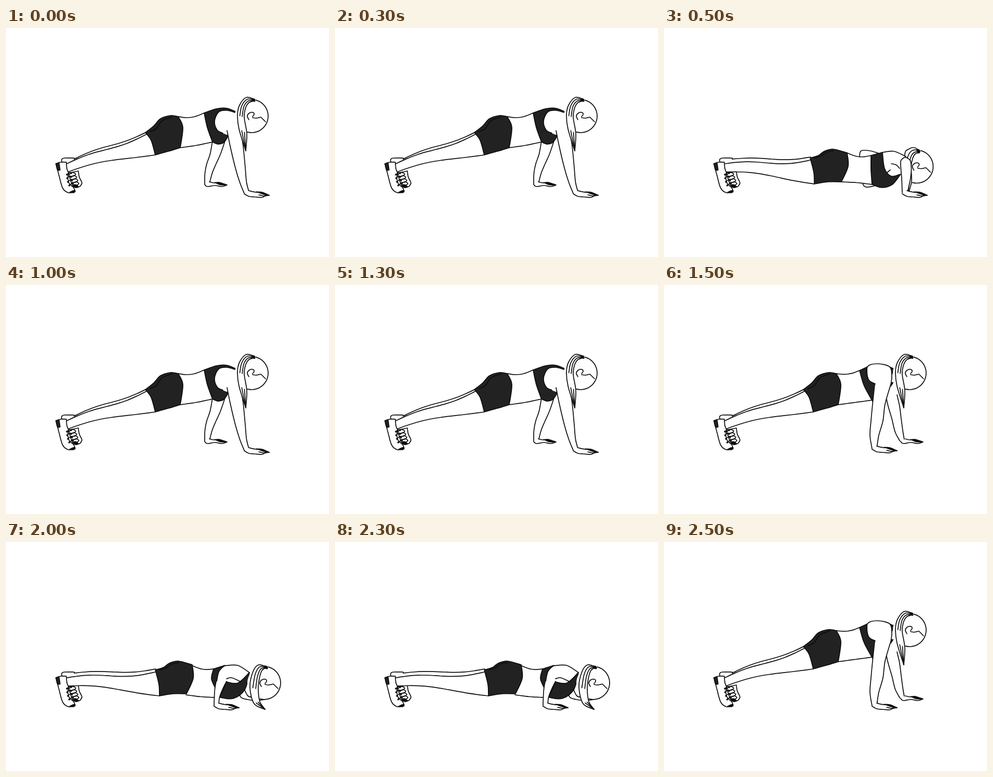
Animation, 621 px wide and 442 px high, one loop 3 s. Source, as an HTML page:

```html
<!DOCTYPE html>
<html lang="en">
<head>
<meta charset="utf-8">
<title>Push-up</title>
<style>
  html, body { margin: 0; width: 100%; height: 100%; overflow: hidden; background: #fff; }
  svg { display: block; width: 621px; height: 442px; }
  path { stroke: #0c0c0c; stroke-width: 1.7; stroke-linejoin: round; stroke-linecap: round; }
  .line, .dot { fill: none; }
  .dot { stroke-width: 3.4; }
  .skin, .fill { fill: #fff; }
  .fill { stroke: none; }
  .cloth { fill: #222; }
  .ink { fill: #0c0c0c; stroke-width: 1; }
</style>
</head>
<body>
<svg id="stage" viewBox="0 0 621 442"></svg>
<script>
const NS = 'http://www.w3.org/2000/svg';
const stage = document.getElementById('stage');
let layer = stage;

const points = s => s.trim().split(/\s+/).map(p => p.split(',').map(Number));
const mix = (a, b, t) => a.map((v, i) => v + (b[i] - v) * t);

// Smooth curve through all points.
function smooth(p) {
  return p.slice(1).map((c, i) => {
    const b = p[i], a = p[i - 1] || b, e = p[i + 2] || c;
    const c1 = b.map((v, k) => v + (c[k] - a[k]) / 6);
    const c2 = c.map((v, k) => v - (e[k] - b[k]) / 6);
    return `C${c1} ${c2} ${c}`;
  }).join('');
}

// Each run is smooth; runs meet in corners ("|" in a string).
function draw(kind, shape) {
  const runs = typeof shape === 'string' ? shape.split('|').map(points) : shape;
  let d = `M${runs[0][0]}`, end = [];
  for (const run of runs) {
    d += smooth([...end, ...run]);
    end = [run[run.length - 1]];
  }
  const el = document.createElementNS(NS, 'path');
  el.setAttribute('class', kind);
  el.setAttribute('d', d);
  layer.appendChild(el);
}

function at(x, y, paint) {
  const parent = layer;
  layer = parent.appendChild(document.createElementNS(NS, 'g'));
  layer.setAttribute('transform', `translate(${x} ${y})`);
  paint();
  layer = parent;
}

// Straight run from a to b with a half-wave and a full-wave bulge.
function wave(a, b, half, full = 0) {
  return Array.from({ length: 9 }, (_, i) => {
    const t = i / 8, [x, y] = mix(a, b, t);
    return [x, y + half * Math.sin(Math.PI * t) + full * Math.sin(2 * Math.PI * t)];
  });
}

// Filled area with only its two long sides outlined.
function strip(one, two) {
  draw('fill', [one, ...[...two].reverse().map(p => [p])]);
  draw('line', [one]);
  draw('line', [two]);
}

// Tapered limb from "x,y,halfWidth" points.
function limb(spec) {
  const p = points(spec);
  strip(p.map(([x, y, w]) => [x - w, y]), p.map(([x, y, w]) => [x + w, y]));
}

function farShoe() {
  draw('skin', '108,260 107,254 112,251 131,251|133,262');
  draw('skin', '120,280 139,276|141,288 146,299 142,306|134,308 127,302 120,280');
  for (let k = 0; k < 4; k++) {
    const x = 121 + 2 * k, y = 283 + 6 * k;
    draw('line', [[[x, y], [x + 7, y - 4], [x + 13, y - 1], [x + 8, y + 3], [x + 2, y + 3]]]);
  }
  draw('ink', '128,304 134,302 140,306|134,308 128,304');
}

function nearShoe() {
  draw('skin', '96,262 105,259 116,259|117,271 120,279|119,291 122,301 130,308 133,316|120,318 109,309 102,285 96,262');
  draw('cloth', '96,262 102,260|104,274|99,274 96,262');
  for (let k = 0; k < 4; k++) {
    const x = 117 + k * k / 2, y = 283 + 7 * k;
    draw('dot', [[[x, y], [x, y]]]);
    draw('line', [[[x, y], [x + 5, y - 4], [x + 9, y - 2]]]);
  }
  draw('ink', '122,317 128,314 133,313|131,318 122,317');
}

function legs(top, mid, bottom, low) {
  const [t, m, b] = low ? [[2, -2.5], [2, -3.5], [-4.5, -2]] : [[0, -2.5], [1, -3], [-6, -1.5]];
  strip(wave([131, 253], top, ...t), wave([119, 278], bottom, ...b));
  draw('line', [wave([117, 262], mid, ...m)]);
}

function hipsHigh() {
  legs([270, 201], [270, 205], [287, 245], false);
  draw('cloth', '268,202 285,188 297,175 316,169 331,171|340,192 335,231|312,238 287,245|279,217 268,202');
  draw('line', '277,200 289,194 300,179 318,172');
}

function hipsLow(dx, dy) {
  legs([282 + dx, 249 + dy], [281 + dx, 255 + dy], [289 + dx, 301 + dy], true);
  at(dx, dy, () => {
    draw('cloth', '281,251 297,246 308,238 326,234 352,241|354,267 341,297|315,297 289,301|288,279 281,251');
    draw('line', '290,251 302,247 312,240 326,237');
  });
}

function nearHand() {
  draw('skin', '0,0 9,5 20,6 34,7 40,4|48,3|34,-3 22,-3 9,-6');
  draw('ink', '23,-4 34,-3 49,3|39,2 23,-4');
  draw('line', '28,2 36,4 42,4');
}

function farHand() {
  draw('skin', '0,0 5,4 20,2 33,4 43,1|28,-4 18,-3 9,-5');
  draw('ink', '19,-4 30,-3 43,1|30,1 19,-4');
}

// Hair strands blend from the left edge to the right edge.
function ponytail(leftSpec, rightSpec) {
  const left = points(leftSpec), right = points(rightSpec);
  strip(left, right);
  for (const t of [0.35, 0.7]) {
    const strand = left.map((p, i) => mix(p, right[i], t));
    draw('line', [strand.slice(0, 4)]);
    draw('line', [strand.slice(-2)]);
  }
}

function skull() {
  const rim = Array.from({ length: 25 }, (_, i) => {
    const a = i / 12 * Math.PI;
    return [472 + 32 * Math.cos(a), 170 + 32 * Math.sin(a)];
  });
  draw('fill', [rim]);
  draw('line', [[...rim.slice(-6), ...rim.slice(1, 8)]]);
  draw('line', '467,177 464,170 468,164 475,163 477,167 474,171');
  draw('line', '474,173 481,174 490,172|499,181');
}

const tie = () => draw('ink', '473,136 478,137 479,142|474,141 473,136');

function headHigh() {
  skull();
  ponytail('478,138 462,134 449,149 445,168 448,195 461,237',
           '476,141 467,144 461,153 458,172 463,204 461,237');
  tie();
}

function highWide() {
  limb('409,218,12 402.5,243,10 395,262,9 389.5,280,7 386.5,301,4.5');
  at(382, 302, farHand);
  strip(wave([331, 171], [381, 164], 5), wave([335, 231], [397, 220], 1));
  hipsHigh();
  draw('cloth', '381,164 404,156 425,155 447,164|424,214 410,224 397,220|387,192 381,164');
  draw('fill', '446,165 425,159 409,162 401,180 406,197 424,206|451,206|446,165');
  draw('line', '446,165 425,159 409,162 401,180 406,197 417,203');
  limb('438,198,13 443.5,228,12.5 450.5,270,9.5 456,298,6.5 463,319,5');
  at(458, 320, nearHand);
  headHigh();
}

function highNarrow() {
  limb('437,212,11 442,234,11 447,258,9 452,284,7.5 458,301,4.5');
  at(455, 302, farHand);
  strip(wave([331, 171], [376, 165], 4), wave([335, 231], [402, 222], 0));
  hipsHigh();
  draw('cloth', '376,165 391,158|406,192|402,226|385,195 376,165');
  draw('cloth', '433,158 443,162|435,179|433,158');
  draw('ink', '431,205 436,190 441,188|431,205');
  draw('fill', '391,158 411,152 434,158 438,175|436,200|405,200|406,191 393,182 391,158');
  draw('line', '406,191 393,182 391,158 411,152 434,158 438,175 436,193');
  limb('420.5,192,15.5 413,230,12 409.5,262,11.5 404.5,290,8.5 404.5,316,4.5');
  at(400, 317, nearHand);
  headHigh();
}

function lowWide() {
  draw('skin', '376,248 379,237 396,237 413,242');
  draw('skin', '382,301 388,307 404,305');
  strip(wave([352, 241], [398, 246], 5), wave([341, 297], [400, 302], -1));
  hipsLow(0, 0);
  at(13.5, 97.5, skull);
  ponytail('492,238 482,231 470,234 463,244 464,290 468,319',
           '491,241 483,243 478,252 475,268 476,296 470,319');
  at(13, 98, tie);
  draw('fill', '420,240 442,238 465,248|457,284|425,282|420,240');
  draw('line', '420,240 442,238 465,248');
  draw('cloth', '398,246 420,240|424,271 437,286 455,282|439,302 419,308 400,302|398,274 398,246');
  draw('line', '429,279 435,274');
  draw('line', '437,262 446,264 453,271');
  limb('464,249,0 464.5,256,9 465.5,272,10 465.5,290,8.5 463,318,5');
  at(458, 320, nearHand);
}

function lowNarrow() {
  draw('skin', '447,282 451,299 464,304 480,306 498,304|480,300 465,297 456,278');
  strip(wave([357, 238], [399, 245], 4), wave([346, 295], [402, 300], 1));
  hipsLow(6, -4);
  draw('fill', '420,239 445,238 468,252|455,272|404,280|420,239');
  draw('line', '420,239 445,238 468,252');
  draw('cloth', '399,245 421,238|409,251 403,283|395,264 399,245');
  draw('cloth', '424,270 446,272 468,252|459,285 437,302 411,300|424,270');
  draw('line', '424,264 434,262 452,270');
  limb('414,269,10 409,284,7.5 405.5,300,5 404.5,316,4.5');
  at(400, 317, nearHand);
  at(24, 102, skull);
  ponytail('503,242 486,237 475,250 469,280 477,312 498,323',
           '501,242 492,248 487,264 485,284 488,308 498,323');
  at(24, 103, tie);
}

const poses = [highWide, lowWide, highNarrow, lowNarrow];
const order = [0, 1, 0, 2, 3, 2];
const steps = order.length;

poses.forEach((pose, n) => at(0, 0, () => {
  farShoe();
  pose();
  nearShoe();
  const frames = [...order, order[steps - 1]].map((k, i) => ({
    offset: i / steps, opacity: k === n ? 1 : 0, easing: 'step-end'
  }));
  layer.animate(frames, { duration: steps * 500, iterations: Infinity });
}));
</script>
</body>
</html>
```
